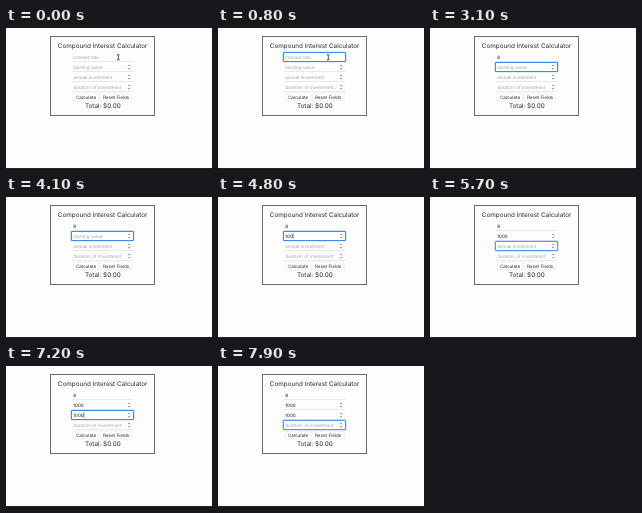
Animation of 206x141 px, one loop 8 s. Source, as an HTML page:

```html
<!DOCTYPE html>
<html lang="en">
<head>
<meta charset="utf-8">
<title>Compound Interest Calculator</title>
<style>
html, body { margin: 0; width: 100%; height: 100%; overflow: hidden; background: #fdfdfd; }
svg { display: block; width: 100vw; height: 100vh; }
text { font-family: Inter, "Liberation Sans", sans-serif; fill: #2a2a2a; text-rendering: geometricPrecision; }
.head { font-size: 6.35px; text-anchor: middle; }
.button { font-size: 4.6px; text-anchor: middle; }
.field { font-size: 4.55px; }
</style>
</head>
<body>
<svg id="stage" viewBox="0 0 206 141">
  <rect width="206" height="141" fill="#fdfdfd"/>
  <path d="M0 140.5H206" stroke="#222"/>
  <rect x="44.5" y="8.5" width="104" height="79" fill="none" stroke="#6a6a6a"/>
  <text class="head" x="96.6" y="20.4">Compound Interest Calculator</text>
  <g id="fields"></g>
  <g id="buttons"></g>
  <text class="head" x="96.8" y="80.3">Total: $0.00</text>
  <path id="pointer" d="M-1.3 -2.7Q0 -2.7 0 -1.9Q0 -2.7 1.3 -2.7M0 -1.9V1.9M-1.3 2.7Q0 2.7 0 1.9Q0 2.7 1.3 2.7" fill="none" stroke="#222" stroke-width=".8"/>
</svg>
<script>
const LOOP = 8000;
const rows = [
  { hint: 'interest rate', focus: 350, keys: [1350], value: '8' },
  { hint: 'starting value', focus: 2650, keys: [4300, 4500, 4680, 4950], value: '1000' },
  { hint: 'annual investment', focus: 5500, keys: [6020, 6200, 6370, 6600], value: '1000' },
  { hint: 'duration of investment', focus: 7700, keys: [], value: '' }
];
const $ = id => document.getElementById(id);
const clamp = v => Math.max(0, Math.min(1, v));
const ease = v => 1 - (1 - clamp(v)) ** 2;

function add(parent, tag, attrs, label) {
  const el = document.createElementNS('http://www.w3.org/2000/svg', tag);
  set(el, attrs);
  if (label) el.textContent = label;
  parent.appendChild(el);
  return el;
}

function set(el, attrs) {
  for (const key in attrs) el.setAttribute(key, attrs[key]);
}

rows.forEach((row, i) => {
  const g = add($('fields'), 'g', { transform: `translate(0 ${29 + i * 10})` });
  add(g, 'path', { d: 'M66 4.5H127.5', stroke: '#dcdcdc', 'stroke-width': 0.6 });
  row.halo = add(g, 'rect', { fill: 'none', stroke: '#8fbcf5', rx: 1.2 });
  row.ring = add(g, 'rect', { x: 65.5, y: -4.5, width: 62, height: 9, rx: 0.6, fill: '#fff', stroke: '#4189ea', 'stroke-width': 1.1 });
  row.text = add(g, 'text', { class: 'field', x: 67.2, y: 1.8 });
  row.caret = add(g, 'path', { stroke: '#222', 'stroke-width': 0.6 });
  if (i) add(g, 'path', {
    d: 'M122.1 -.9L123.2 -2L124.3 -.9M122.1 1L123.2 2.1L124.3 1',
    fill: 'none', stroke: '#555', 'stroke-width': 0.7
  });
});

for (const [x, w, label] of [[67.3, 25.4, 'Calculate'], [94.2, 31.8, 'Reset Fields']]) {
  const g = $('buttons');
  add(g, 'rect', { x, y: 65.2, width: w, height: 7.6, rx: 1.4, fill: '#fff', stroke: '#e2e2e2', 'stroke-width': 0.5 });
  add(g, 'text', { class: 'button', x: x + w / 2, y: 70.7 }, label);
}

function drawRow(row, t, end) {
  const on = t >= row.focus && t < end;
  const p = ease((t - row.focus) / 400);
  const typed = row.keys.filter(k => t >= k).length;
  row.text.textContent = typed ? row.value.slice(0, typed) : row.hint;
  row.text.style.fill = typed ? '#111' : '#a5a5a5';

  const spread = 0.5 + (1 - p) * 0.8;
  set(row.halo, {
    x: 65.5 - spread, y: -4.5 - spread, width: 62 + spread * 2, height: 9 + spread * 2,
    'stroke-width': 1, opacity: on ? 0.5 : 0
  });
  row.ring.setAttribute('opacity', on ? 0.4 + 0.6 * p : 0);

  const last = typed ? row.keys[typed - 1] : row.focus;
  const blink = typed > 0 && t - last < 300 || (t - last) % 1000 > 500;
  const x = 67.4 + (typed ? row.text.getComputedTextLength() : 0);
  set(row.caret, { d: `M${x} -2.6V2.8`, opacity: on && blink ? 1 : 0 });
}

function draw(t) {
  rows.forEach((row, i) => drawRow(row, t, i < 3 ? rows[i + 1].focus : LOOP));
  const move = ease((t - 100) / 250);
  set($('pointer'), {
    transform: `translate(${112.3 - move * 2} 29.3)`,
    opacity: t < rows[0].keys[0] ? 1 : 0
  });
}

const start = performance.now();
function tick() {
  draw((performance.now() - start) % LOOP);
  requestAnimationFrame(tick);
}
tick();
</script>
</body>
</html>
```
